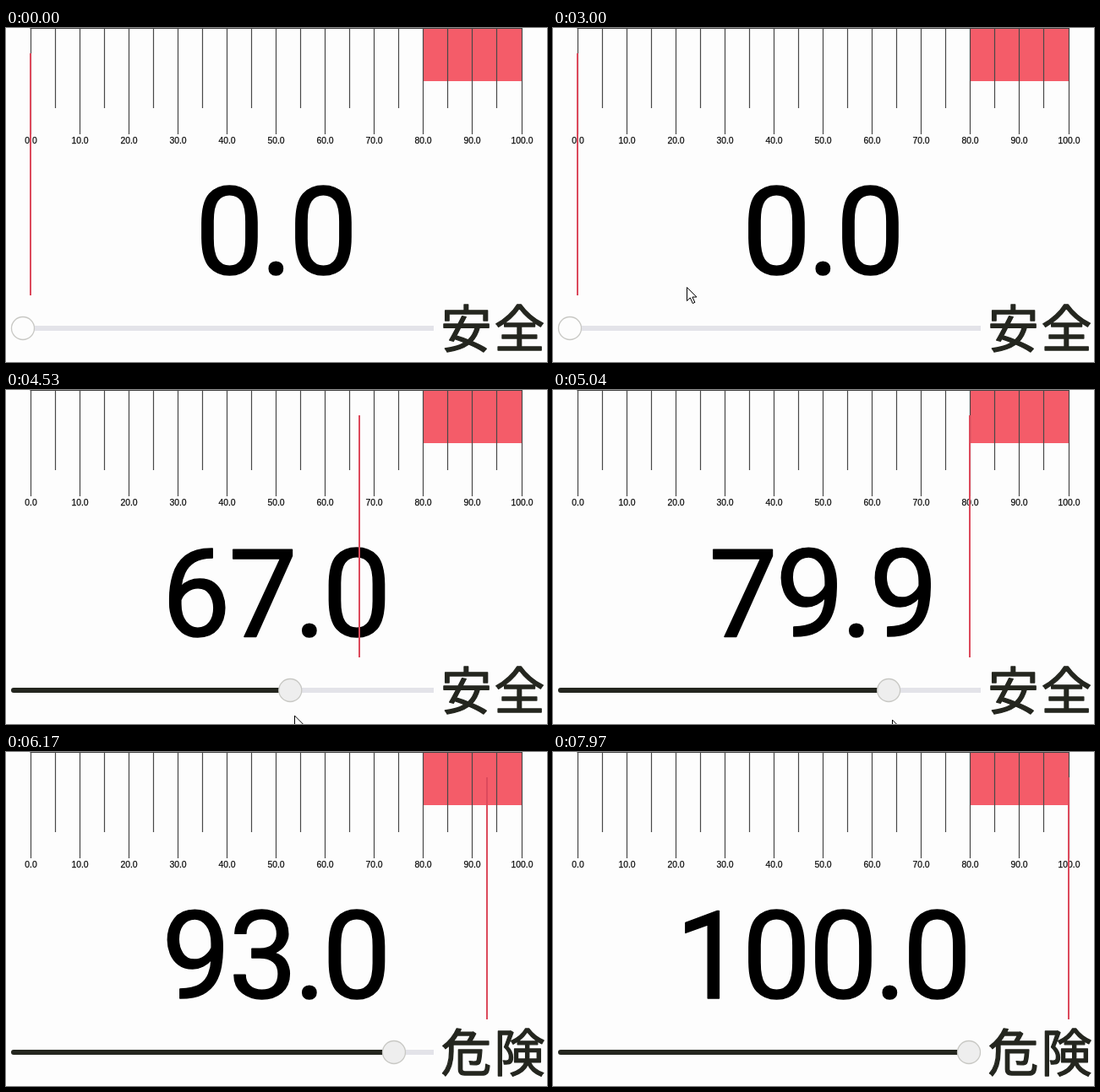
Write an HTML page with a canvas that moves like this. It is 640x396 px and loops after 8000 ms.

```html
<!DOCTYPE html>
<html lang="ja">
<head>
<meta charset="utf-8">
<title>Gauge and slider</title>
<style>
  html, body { margin: 0; width: 100%; height: 100%; overflow: hidden; background: #fdfdfd; }
  canvas { display: block; }
</style>
</head>
<body>
<canvas id="stage" width="640" height="396"></canvas>
<script>
const ctx = document.getElementById('stage').getContext('2d');
const LOOP = 8000, GRAB = 3370;
const PAPER = '#fdfdfd', INK = '#24261f';
const DIGITS = 'Roboto, sans-serif';
const SANS = '"Liberation Sans", Arial, sans-serif';
const CJK = '"Noto Sans CJK JP", "Noto Sans CJK", sans-serif';

const gaugeX = v => 29 + 5.81 * v;
const thumbX = v => 20 + 4.72 * v;
const progress = (t, from, to) => Math.min(1, Math.max(0, (t - from) / (to - from)));
const ease = u => u * u * (3 - 2 * u);
const mix = (a, b, u) => a + (b - a) * u;

// S-curve up to the danger zone, one swell above it, then a run to the end
function gaugeValue(t) {
  if (t < GRAB) return 0;
  const rise = 80.7 / (1 + Math.exp((4264 - t) * 0.00594));
  const swell = progress(t, 5570, 6870);
  const finish = progress(t, 6870, 7950) ** 4;
  const v = rise - 2.1 * swell + 13.5 * Math.sin(Math.PI * swell) ** 2;
  return Math.round(mix(v, 100, finish) * 10) / 10;
}

// Spiral in, glide to the thumb, then drag it while sinking out of view
function pointerAt(t, v) {
  const dragX = thumbX(v) + 13 - 0.12 * v;
  const dragY = 360 + 0.385 * v + 14 * ease(progress(t, 5600, 6400));
  if (t >= GRAB) return [dragX, dragY];
  const radius = (1 - progress(t, 0, 2300)) ** 0.65;
  const angle = t * 0.00691;
  const glide = ease(progress(t, 2530, 3330));
  return [
    mix(372 + 275 * radius * Math.cos(angle), dragX, glide),
    mix(217 + 180 * radius * Math.sin(angle), dragY, glide)
  ];
}

function line(x1, y1, x2, y2, color, width, cap = 'butt') {
  ctx.strokeStyle = color;
  ctx.lineWidth = width;
  ctx.lineCap = cap;
  ctx.beginPath();
  ctx.moveTo(x1, y1);
  ctx.lineTo(x2, y2);
  ctx.stroke();
}

function boldText(text, x, y, color, weight) {
  ctx.fillStyle = ctx.strokeStyle = color;
  ctx.lineWidth = weight;
  ctx.lineJoin = 'round';
  ctx.fillText(text, x, y);
  ctx.strokeText(text, x, y);
}

function drawScale() {
  ctx.fillStyle = '#f45c69';
  ctx.fillRect(494, 0, 116, 63);
  line(28.5, 0.5, 610.5, 0.5, '#444', 1);
  ctx.font = '10.4px ' + SANS;
  for (let v = 0; v <= 100; v += 5) {
    const major = v % 10 === 0, x = Math.floor(gaugeX(v)) + 0.5;
    line(x, 0, x, major ? 126 : 95, '#484848', 1.2);
    if (major) boldText(v.toFixed(1), x, 136.5, '#111', 0.25);
  }
}

function drawReading(v) {
  const text = v.toFixed(1);
  const advance = ch => ch === '.' ? 32 : 79;
  let x = 320 - [...text].reduce((sum, ch) => sum + advance(ch), 0) / 2;
  ctx.font = '145px ' + DIGITS;
  for (const ch of text) {
    boldText(ch, x + advance(ch) / 2, 291.5, '#000', 1.5);
    x += advance(ch);
  }
}

function drawSlider(v) {
  const x = thumbX(v), y = 356;
  line(x, y, 506, y, '#e3e3e9', 6);
  if (v > 0) line(9, y, Math.max(9, x), y, INK, 6, 'round');
  ctx.beginPath();
  ctx.arc(x, y, 13.5, 0, Math.PI * 2);
  ctx.fillStyle = v > 0 ? '#eeeeee' : PAPER;
  ctx.fill();
  ctx.strokeStyle = '#c8c8c4';
  ctx.lineWidth = 1.3;
  ctx.stroke();
}

function drawStatus(v) {
  ctx.font = '60px ' + CJK;
  ctx.letterSpacing = '3px';
  boldText(v >= 80 ? '危険' : '安全', 577.5, 378.5, INK, 1.3);
  ctx.letterSpacing = '0px';
}

const arrow = new Path2D('M.5 .5v16l3.8-3.6 3 6.6 2.6-1.2-3-6.3h5z');

function drawPointer(x, y) {
  ctx.save();
  ctx.translate(Math.round(x), Math.round(y));
  ctx.fillStyle = '#fff';
  ctx.strokeStyle = '#000';
  ctx.lineWidth = 1;
  ctx.fill(arrow);
  ctx.stroke(arrow);
  ctx.restore();
}

function draw() {
  const t = performance.now() % LOOP;
  const v = gaugeValue(t);
  ctx.fillStyle = PAPER;
  ctx.fillRect(0, 0, 640, 396);
  ctx.textAlign = 'center';
  drawScale();
  drawReading(v);
  const x = Math.round(gaugeX(v));
  line(x, 30, x, 317, '#dc4a5c', 2);
  drawSlider(v);
  drawStatus(v);
  drawPointer(...pointerAt(t, v));
  requestAnimationFrame(draw);
}
draw();
</script>
</body>
</html>
```
